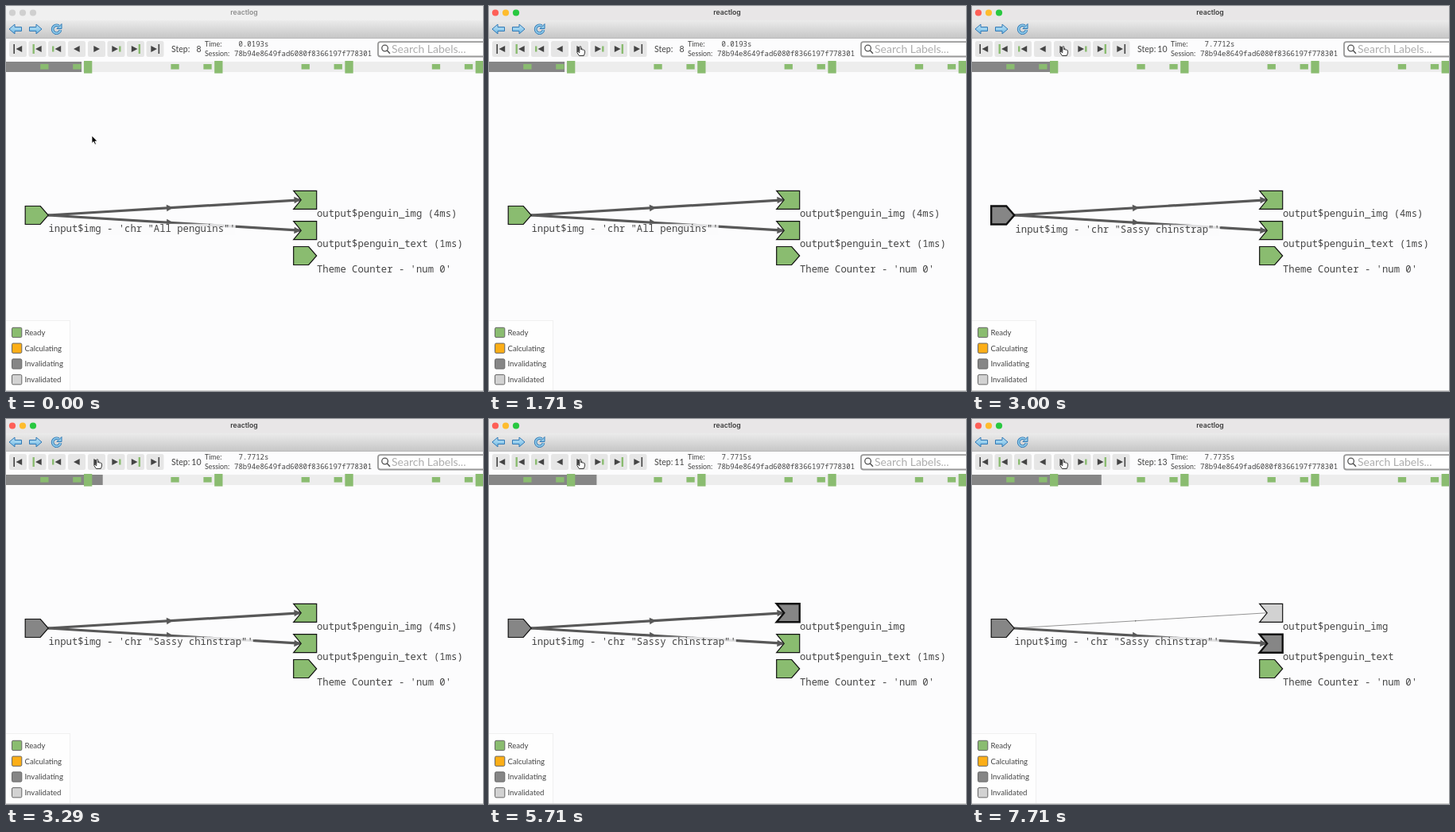
Recreate the animation shown at these times as an HTML page. Size 600x484 px, loop 8 s.

```html
<!DOCTYPE html>
<html lang="en">
<head>
<meta charset="utf-8">
<title>reactlog</title>
<style>
  html, body { margin: 0; width: 100%; height: 100%; overflow: hidden; background: #fcfcfd; }
  svg { display: block; }
  text { white-space: pre; }
  .sans { font-family: Lato, "Open Sans", sans-serif; fill: #444; }
  .mono { font-family: "Noto Sans Mono", "DejaVu Sans Mono", monospace; fill: #444; font-size: 12.25px; }
  .small { font-size: 9.03px; }
</style>
</head>
<body>
<svg id="stage" width="600" height="484" viewBox="0 0 600 484">
  <defs>
    <linearGradient id="bar" x1="0" y1="0" x2="0" y2="1">
      <stop offset="0" stop-color="#ebebeb"/>
      <stop offset="1" stop-color="#c6c6c6"/>
    </linearGradient>
    <linearGradient id="blue" x1="0" y1="0" x2="0" y2="1">
      <stop offset="0" stop-color="#c3e6f7"/>
      <stop offset="1" stop-color="#6db7e3"/>
    </linearGradient>
  </defs>
</svg>
<script>
const LOOP = 8000;
const GREEN = '#8abc70', GREY = '#868686', PALE = '#d2d2d2', EDGE = '#585858';
const stage = document.getElementById('stage');

function add(tag, attrs, parent = stage) {
  const el = document.createElementNS('http://www.w3.org/2000/svg', tag);
  set(el, attrs);
  parent.appendChild(el);
  return el;
}
function set(el, attrs) {
  for (const k in attrs) el.setAttribute(k, attrs[k]);
}
const rect = (x, y, width, height, fill, more) => add('rect', { x, y, width, height, fill, ...more });
const path = (d, more, parent) => add('path', { d, ...more }, parent);
function text(x, y, str, cls, more) {
  const el = add('text', { x, y, class: cls, ...more });
  el.textContent = str;
  return el;
}

// Window chrome
const titleBar = rect(0, 0, 600, 18, '#eee');
const title = text(299.5, 11.4, 'reactlog', '', {
  'text-anchor': 'middle', 'font-family': 'Inter, sans-serif', 'font-size': 8.7, 'font-weight': 600
});
const lights = [8, 21, 34].map(cx => add('circle', { cx, cy: 8.5, r: 4.1 }));
rect(0, 18, 600, 22.5, 'url(#bar)');
rect(0, 40, 600, 1, '#b9b9b9');
const navArrow = 'M4 29L11 23V26.5H19.5V31.5H11V35Z';
const navStyle = { fill: 'url(#blue)', stroke: '#2f78b5', 'stroke-width': 1, 'stroke-linejoin': 'round' };
path(navArrow, navStyle);
path(navArrow, { ...navStyle, transform: 'matrix(-1 0 0 1 49 0)' });
for (const [stroke, width] of [['#2f78b5', 3.6], ['#8fcbea', 1.8]])
  path('M68.5 30.2A5 5 0 1 1 66.3 25', { fill: 'none', stroke, 'stroke-width': width });
path('M70 22.5V28.5H64Z', { ...navStyle, fill: '#8fcbea' });

// Step controls: [centre, direction, bar height, bar colour]
const controls = [
  [15, -1, 12, '#444'], [39.5, -1, 12, GREEN], [64, -1, 7, GREEN], [89, -1, 0],
  [114, 1, 0], [138.5, 1, 7, GREEN], [163, 1, 12, GREEN], [187.5, 1, 12, '#444']
];
for (const [cx, dir, h, color] of controls) {
  rect(cx - 11, 44, 22, 20, '#e6e6e6', { rx: 2.5 });
  const mid = cx + (h ? -dir * 1.5 : 0);
  path(`M${mid + dir * 4} 54L${mid - dir * 3.7} 50V58Z`, { fill: '#444' });
  const w = color === GREEN ? 2.4 : 1.6;
  if (h) rect(cx + dir * 4.8 - w / 2, 54 - h / 2, w, h, color);
}

text(208, 58, 'Step:', 'sans', { 'font-size': 10.5 });
const stepText = text(245.5, 58, '', 'sans', { 'font-size': 10.5, 'text-anchor': 'end' });
text(250, 51, 'Time:', 'sans', { 'font-size': 8.8 });
text(250, 63, 'Session:', 'sans', { 'font-size': 8.8 });
const timeText = text(292.5, 51, '', 'mono small');
text(287, 63, '78b94e8649fad6080f8366197f778301', 'mono small');

rect(468, 45.2, 150, 18.3, '#fff', { rx: 3, stroke: '#989898', 'stroke-width': 1.8 });
add('circle', { cx: 476.6, cy: 53, r: 3.8, fill: 'none', stroke: '#555', 'stroke-width': 1.3 });
path('M479.4 56L483 59.8', { stroke: '#555', 'stroke-width': 1.6 });
text(485, 59.3, 'Search Labels...', 'sans', { 'font-size': 14, style: 'fill:#adadad' });

// Timeline
rect(0, 70, 600, 13, '#ededed');
const progress = rect(0, 70, 95, 13, GREY);
for (let x = 0; x < 600; x += 164.2) {
  rect(x + 43.2, 73, 10.3, 6.6, GREEN);
  rect(x + 84.2, 73, 10.3, 6.6, GREEN);
  rect(x + 98, 69, 10.3, 15.6, GREEN);
}

// Graph
function makeEdge(y) {
  const angle = Math.atan2(y - 263, 318) * 180 / Math.PI;
  const line = path(`M53 263L370 ${y}`, { fill: 'none' });
  const heads = [[206, 263 + (y - 263) * 153 / 318], [366.5, y]].map(([x, hy]) => {
    const el = path('M4.5 0L-4 -4.2V4.2Z', {});
    return { el, place: `translate(${x} ${hy}) rotate(${angle})` };
  });
  return thin => {
    const color = thin > 0.5 ? '#949494' : EDGE;
    set(line, { stroke: color, 'stroke-width': 3.2 - 2.2 * thin });
    heads.forEach(({ el, place }, i) => {
      const size = 1 - (i ? 1 : 0.8) * thin;
      set(el, { fill: EDGE, transform: `${place} scale(${size})` });
    });
  };
}
const imgEdge = makeEdge(243.8);
const textEdge = makeEdge(282.2);
textEdge(0);

const TAG = 'M-14.5 -11.5H4.5L14.5 0L4.5 11.5H-14.5Z';
const FLAG = 'M-14.5 -11.5H14.5V11.5H-14.5L-5 0Z';
function makeNode(shape, cx, cy) {
  const el = path(shape, { stroke: '#111', transform: `translate(${cx} ${cy})` });
  return (fill, active) => set(el, { fill, 'stroke-width': active ? 2.4 : 1.2 });
}
const inputNode = makeNode(TAG, 38.7, 263);
const imgNode = makeNode(FLAG, 376.2, 243.8);
const textNode = makeNode(FLAG, 376.2, 282.2);
makeNode(TAG, 376.2, 314)(GREEN, false);

const inputBack = rect(53.5, 273.8, 236, 14, '#fcfcfd', { opacity: 0.82 });
const inputLabel = text(53.5, 284.3, '', 'mono');
const imgLabel = text(391, 264.8, '', 'mono');
const textLabel = text(391, 303.3, '', 'mono');
text(391, 335, "Theme Counter - 'num 0'", 'mono');

// Legend
rect(-1, 395.5, 81.5, 90, '#fefefe', { stroke: '#f0f0f0' });
[['Ready', GREEN], ['Calculating', '#fcae17'], ['Invalidating', GREY], ['Invalidated', PALE]]
  .forEach(([name, fill], i) => {
    const y = 410.3 + i * 19.75;
    rect(7.5, y - 6, 12.3, 12.3, fill, { rx: 1.5, stroke: '#666', 'stroke-width': 1 });
    text(23.5, y + 3.6, name, 'sans', { 'font-size': 9.6 });
  });
rect(0, 483.2, 600, 0.8, '#c4c4c4');

// Pointers
const arrow = path('M0 0V9.6L2.2 7.6L3.8 11.2L5.4 10.5L3.9 7H7Z',
  { fill: '#000', stroke: '#fff', 'stroke-width': 0.8 });
const hand = path('M-1 0.8Q0 -0.4 1 0.8V4.2Q2 3.6 2.8 4.6Q3.8 4 4.4 5Q5.6 4.6 5.7 6V8.4L4.4 12H-1.4L-4 8Q-4.2 6.6 -2.8 6.8L-1 8.2Z',
  { fill: '#fff', stroke: '#222', 'stroke-width': 0.9, 'stroke-linejoin': 'round', transform: 'translate(114.8 50.5)' });

// State of the log from each time on
const steps = [
  { at: 0, step: 8, time: '0.0193s', bar: 95, pick: 'All penguins', img: GREEN, txt: GREEN },
  { at: 1860, step: 10, time: '7.7712s', bar: 108, pick: 'Sassy chinstrap', active: 'input', input: GREY, img: GREEN, txt: GREEN },
  { at: 3140, step: 10, time: '7.7712s', bar: 121.7, pick: 'Sassy chinstrap', input: GREY, img: GREEN, txt: GREEN },
  { at: 4570, step: 11, time: '7.7715s', bar: 135.4, pick: 'Sassy chinstrap', active: 'img', input: GREY, img: GREY, txt: GREEN },
  { at: 6000, step: 12, time: '7.7732s', bar: 149.1, pick: 'Sassy chinstrap', active: 'img', input: GREY, img: GREY, txt: GREEN },
  { at: 7290, step: 13, time: '7.7735s', bar: 162.8, pick: 'Sassy chinstrap', active: 'txt', input: GREY, img: PALE, txt: GREY }
];
const FOCUS = 1290;

function ease(t, from, to) {
  const p = Math.min(1, Math.max(0, (t - from) / (to - from)));
  return p * p * (3 - 2 * p);
}

function render(t) {
  const i = steps.findLastIndex(s => t >= s.at);
  const s = steps[i], prev = steps[Math.max(0, i - 1)];

  const focused = t >= FOCUS;
  set(titleBar, { fill: focused ? '#e8e6e7' : '#f0f0f0' });
  set(title, { fill: focused ? '#3c3c3c' : '#8e8e8e' });
  const colors = focused ? ['#fe5f57', '#febc2e', '#28c840'] : Array(3).fill('#d0d0d0');
  lights.forEach((el, n) => set(el, { fill: colors[n] }));

  stepText.textContent = s.step;
  timeText.textContent = s.time;
  set(progress, { width: prev.bar + (s.bar - prev.bar) * ease(t, s.at - 50, s.at + 150) });

  const inputActive = s.active === 'input';
  const shift = inputActive ? 1 : 0;
  const label = `input$img - 'chr "${s.pick}"'`;
  inputLabel.textContent = label;
  set(inputLabel, { x: 53.5 + shift, y: 284.3 + shift });
  set(inputBack, { x: 53.5 + shift, y: 273.8 + shift, width: label.length * 7.35 });
  inputNode(s.input || GREEN, inputActive);

  imgNode(s.img, s.active === 'img');
  textNode(s.txt, s.active === 'txt');
  imgLabel.textContent = 'output$penguin_img' + (s.img === GREEN ? ' (4ms)' : '');
  textLabel.textContent = 'output$penguin_text' + (s.txt === GREEN ? ' (1ms)' : '');
  imgEdge(ease(t, 5950, 6290));

  const p = ease(t, 140, 1140);
  set(arrow, { transform: `translate(${108 + 6 * p} ${163 - 112 * p})`, visibility: p < 1 ? 'visible' : 'hidden' });
  set(hand, { visibility: p < 1 ? 'hidden' : 'visible' });
}

function tick() {
  render(performance.now() % LOOP);
  requestAnimationFrame(tick);
}
tick();
</script>
</body>
</html>
```
